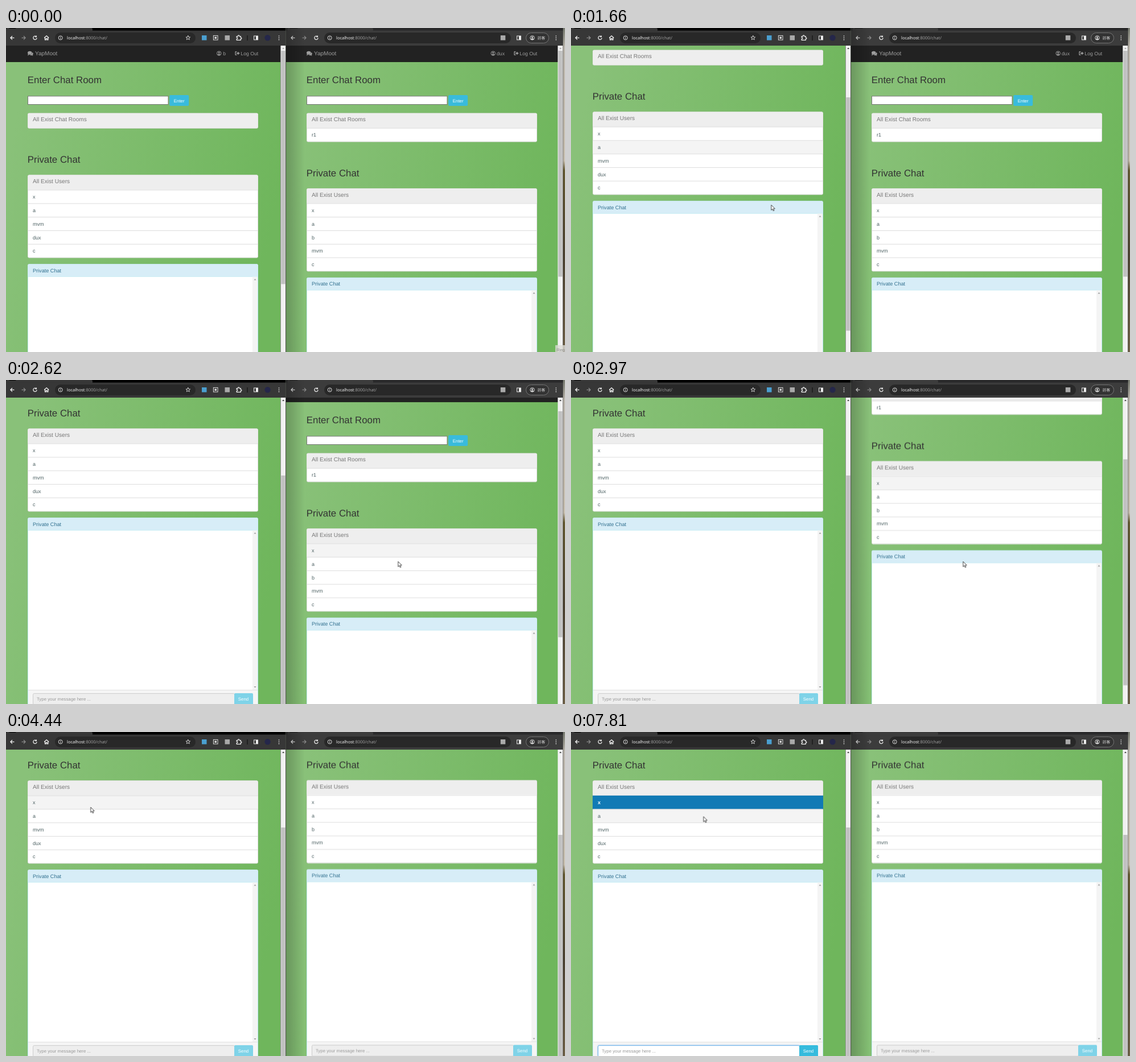
Recreate the animation shown at these times as an HTML page. Size 982x570 px, loop 8 s.

```html
<!DOCTYPE html>
<html lang="en">
<head>
<meta charset="utf-8">
<title>Two chat windows</title>
<style>
html, body { margin: 0; width: 100%; height: 100%; overflow: hidden; background: #000; }
svg { display: block; width: 100%; height: 100%; }
text { font-family: "Liberation Sans", Arial, sans-serif; text-rendering: geometricPrecision; white-space: pre; }
.url { font: 7.5px "Open Sans", sans-serif; }
.cjk { font: 6.7px "Noto Sans CJK TC", "Noto Sans CJK", sans-serif; }
.h { font-size: 16.85px; fill: #333; }
.head { font-size: 10.1px; fill: #777; }
.item { font-size: 9px; fill: #4c6062; }
.panel { font-size: 9.1px; fill: #31708f; }
.small { font-size: 7.85px; }
.nav { fill: #9d9d9d; }
.line { fill: none; stroke-linecap: round; stroke-linejoin: round; stroke-width: 1.3; }

/* --k turns scroll distance into page (-1) or thumb movement */
.page { --k: -1; }
.left .scroll { animation: scrollLeft 8s infinite ease-in-out; }
.right .scroll { animation: scrollRight 8s infinite ease-in-out; }
@keyframes scrollLeft {
  0%, 13.375% { transform: translateY(0); }
  16%, 18.375% { transform: translateY(calc(56px * var(--k))); }
  21%, 21.875% { transform: translateY(calc(112px * var(--k))); }
  24.375% { transform: translateY(calc(168px * var(--k))); }
  25.7%, 100% { transform: translateY(calc(173px * var(--k))); }
}
@keyframes scrollRight {
  0%, 31.75% { transform: translateY(0); }
  34.125% { transform: translateY(calc(56px * var(--k))); }
  36% { transform: translateY(calc(112px * var(--k))); }
  38.3%, 38.5% { transform: translateY(calc(168px * var(--k))); }
  41.1%, 100% { transform: translateY(calc(197.5px * var(--k))); }
}

.left .up { animation: wakeLeft 8s infinite step-end; }
.right .up { animation: wakeRight 8s infinite step-end; }
@keyframes wakeLeft { 0% { fill: #a3a3a3; } 13.9%, 100% { fill: #404040; } }
@keyframes wakeRight { 0% { fill: #a3a3a3; } 32%, 100% { fill: #404040; } }

.toggle { opacity: 0; animation: 8s infinite step-end; }
.left .row0 { animation-name: hoverFirst; }
.left .row1 { animation-name: hoverSecond; }
.right .row0 { animation-name: hoverRight; }
.left .chosen { animation-name: choose; }
.left .ready { animation-name: enable; }
.left .caret { animation-name: blink; }
.tip { animation-name: tip; }
@keyframes hoverFirst {
  0% { opacity: 0; } 53.75% { opacity: 1; } 78.75% { opacity: 0; }
  86.5%, 100% { opacity: 1; }
}
@keyframes hoverSecond {
  0% { opacity: 0; } 12% { opacity: 1; } 27.5% { opacity: 0; }
  78.75% { opacity: 1; } 86.5% { opacity: 0; } 91.5%, 100% { opacity: 1; }
}
@keyframes hoverRight { 0% { opacity: 0; } 31% { opacity: 1; } 46.2%, 100% { opacity: 0; } }
@keyframes choose { 0% { opacity: 0; } 89.2%, 100% { opacity: 1; } }
@keyframes enable { 0% { opacity: 0; } 90.1%, 100% { opacity: 1; } }
@keyframes blink { 0% { opacity: 0; } 90.1% { opacity: 1; } 97.6%, 100% { opacity: 0; } }
@keyframes tip { 0% { opacity: 1; } .87%, 100% { opacity: 0; } }

.shown { animation: appear 8s infinite step-end; }
@keyframes appear { 0% { opacity: 0; } 5%, 100% { opacity: 1; } }
.cursor { animation: move 8s infinite linear; }
@keyframes move {
  0%, 5% { transform: translate(929px, 545px); }
  8% { transform: translate(697px, 429px); }
  12%, 24.5% { transform: translate(351.5px, 311px); }
  28.4% { transform: translate(474px, 316px); }
  31%, 45.1% { transform: translate(688.5px, 319px); }
  47% { transform: translate(660px, 330px); }
  52% { transform: translate(263px, 228px); }
  54.5% { transform: translate(150px, 123px); }
  55.5%, 74.6% { transform: translate(148.5px, 132px); }
  78.5% { transform: translate(175px, 148px); }
  82% { transform: translate(224px, 163px); }
  85%, 86% { transform: translate(231px, 158px); }
  87.5%, 90% { transform: translate(232px, 133px); }
  91.7%, 92.8% { transform: translate(232px, 139px); }
  94.4%, 100% { transform: translate(232.5px, 148.5px); }
}
</style>
</head>
<body>
<svg id="stage" viewBox="0 0 982 570"></svg>
<script>
const ROW = 23.8;

const rect = (x, y, w, h, fill, more = '') =>
  `<rect x="${x}" y="${y}" width="${w}" height="${h}" fill="${fill}" ${more}/>`;
const text = (x, y, label, cls, more = '') =>
  `<text x="${x}" y="${y}" class="${cls}" ${more}>${label}</text>`;
const line = (d, color, more = '') =>
  `<path class="line" d="${d}" stroke="${color}" ${more}/>`;
const circle = (x, y, r, fill, more = '') =>
  `<circle cx="${x}" cy="${y}" r="${r}" fill="${fill}" ${more}/>`;
const arrow = (x, y, dir, cls, fill) =>
  `<path class="${cls}" fill="${fill}" d="M${x - 2} ${y + dir}h4l-2 ${-2.4 * dir}z"/>`;

const person = (x, y, color) =>
  circle(x, y, 3.7, 'none', `stroke="${color}"`) + circle(x, y - 1, 1.4, color) +
  `<path fill="${color}" d="M${x - 2.6} ${y + 2.3}q2.6 -3 5.2 0q-2.6 2.2 -5.2 0z"/>`;

// Browser toolbar parts
const back = (x, color) => line(`M${x + 3} 17.3h-6m2.7 -2.8l-2.8 2.8l2.8 2.8`, color);
const forward = (x, color) => line(`M${x - 3} 17.3h6m-2.7 -2.8l2.8 2.8l-2.8 2.8`, color);
const reload = x => line(`M${x + 2.3} 15.2a3.1 3.1 0 1 0 .7 2.8m-.6 -4.2v1.8h-1.9`, '#e4e4e4');
const sidePanel = x =>
  rect(x - 3.4, 14, 6.8, 6.8, 'none', 'stroke="#eee"') + rect(x, 14, 3.4, 6.8, '#eee');
const dots = x => [14, 17.3, 20.6].map(y => circle(x, y, .85, '#eee')).join('');
const address = (x, w, textX) =>
  rect(x, 8, w, 19, '#282828', 'rx="9.5"') +
  circle(x + 9.7, 17.3, 3.5, 'none', 'stroke="#ddd"') +
  rect(x + 9.2, 16.7, 1, 2.6, '#ddd') + rect(x + 9.2, 15, 1, 1, '#ddd') +
  text(textX, 20, 'localhost<tspan fill="#a5a5a5">:8000/chat/</tspan>', 'url', 'fill="#fff"');

const leftBar =
  rect(0, 0, 492, 6, '#000') + rect(0, 0, 152, 6, '#373737', 'rx="2"') +
  rect(5, -4, 13, 5, '#000', 'rx="2"') + rect(0, 4.5, 492, 26.5, '#373737') +
  back(11, '#f0f0f0') + forward(31, '#8a8a8a') + reload(51) +
  line('M67.5 17l3.7 -3.2l3.7 3.2m-6.4 -.6v4.5h1.8v-2.6h1.8v2.6h1.8v-4.5', '#eee') +
  address(86, 247, 107) +
  line('M319.8 13.4l1.1 2.5l2.7 .2l-2.1 1.8l.7 2.7l-2.4 -1.5l-2.4 1.5l.7 -2.7l-2.1 -1.8l2.7 -.2z',
    '#ddd', 'style="stroke-width:.9"') +
  rect(344, 13, 8.5, 8.5, '#4a9fd0') +
  rect(364.4, 13.4, 7.6, 7.6, 'none', 'stroke="#ddd"') + rect(366.5, 15.5, 3.4, 3.4, '#ddd') +
  rect(384.5, 13, 8.5, 8.5, '#a9a9a9') +
  line('M405.2 14.6h2.2q0 -1.8 1.3 -1.8t1.3 1.8h2.3v2.2q1.6 0 1.6 1.2t-1.6 1.2v2.1h-7.1v-2q1.6 -.2 1.6 -1.3t-1.6 -1.3z', '#eee') +
  rect(423.5, 13, 1, 9, '#0c0c0c') + sidePanel(439) +
  circle(459.5, 17.3, 5.2, '#25274a') + dots(479.5);

const rightBar =
  rect(492, 0, 487, 6, '#29292a') + rect(494, 0, 151, 6, '#3c3c3c', 'rx="2"') +
  rect(498, -4, 15, 5, '#222', 'rx="2"') + rect(492, 4.5, 487, 26.5, '#3c3c3c') +
  back(504, '#ddd') + forward(524, '#858585') + reload(545) + address(559, 328, 580) +
  rect(868.8, 13, 8.5, 8.5, '#aaa') + sidePanel(901) +
  rect(913.5, 8.5, 40, 18, '#333', 'rx="9" stroke="#757575"') +
  person(924.5, 17.3, '#ddd') + text(933.8, 19.8, '訪客', 'cjk', 'fill="#ddd"') + dots(966.3);

const navBar = user =>
  rect(0, 31, 482, 28.6, '#222') + rect(0, 59, 482, .7, '#101010') +
  '<g class="nav"><ellipse cx="41.8" cy="43.8" rx="3.8" ry="3"/><path d="M39 45.5l-1 3l3 -1.6z"/>' +
  '<path d="M46.2 42.8q3.2 2.5 .4 4.6l1.2 1.7l-3 -1q-2.4 .2 -3.2 -1q4.2 -.2 4.6 -4.3z"/>' +
  '<path d="M405.4 41h-2q-1 0 -1 1v5q0 1 1 1h2v-1.2h-1.7v-4.6h1.7z"/>' +
  '<path d="M405 43.6h2.4v-2l3.2 3l-3.2 3v-2h-2.4z"/></g>' +
  text(51, 48.2, 'YapMoot', 'nav', 'font-size="10"') +
  person(386 - user.length * 4.6 - 6.5 - (user.length < 2 ? .7 : 0), 44.6, '#9d9d9d') +
  text(386, 47.8, user, 'nav', 'font-size="8.7" text-anchor="end"') +
  text(412.3, 47.8, 'Log Out', 'nav', 'font-size="8.7"');

const list = (y, title, items, live) => {
  const height = 26.3 + items.length * ROW;
  const rows = items.map((label, i) => {
    const top = y + 26.3 + i * ROW;
    const hover = live && i < 2 ? rect(38.5, top, 404, ROW, '#f4f4f4', `class="toggle row${i}"`) : '';
    const chosen = live && !i
      ? `<g class="toggle chosen">${rect(38, top - .3, 405, ROW + .3, '#117ab5')}` +
        text(47, top + 15, label, 'item', 'style="fill:#fff;font-weight:bold"') + '</g>' : '';
    return hover + rect(38.5, top - .5, 404, 1, '#ddd') + text(47, top + 15, label, 'item') + chosen;
  });
  return rect(38.5, y, 404, height, '#fff', 'rx="2" stroke="#ddd"') +
    rect(38.5, y, 404, 26, '#eee', 'rx="2"') + text(47, y + 14.4, title, 'head') + rows.join('');
};

const messageBox = (y, field, border, button, extra = '') =>
  rect(47.5, y, 354, 19.5, field, `stroke="${border}" rx="2" ${extra}`) +
  rect(401, y - .5, 33, 20.5, button, 'rx="2"') +
  text(54, y + 12.3, 'Type your message here ...', 'small', 'fill="#999"') +
  text(407.8, y + 12.3, 'Send', 'small', 'fill="#fff"');

const chat = y =>
  rect(38.5, y, 404, 345, '#fff', 'rx="2" stroke="#bce8f1"') +
  rect(38.5, y, 404, 21.5, '#d7edf7', 'rx="2"') + rect(38.5, y + 21.3, 404, .8, '#bce8f1') +
  text(47, y + 14, 'Private Chat', 'panel') +
  rect(433, y + 22, 9, 281, '#f4f4f4') +
  arrow(437.5, y + 27, 1, '', '#999') + arrow(437.5, y + 124.5 + 173, -1, '', '#999') +
  rect(39, y + 302.6, 403, 40, '#f5f5f5') + rect(39, y + 302.4, 403, .8, '#ddd') +
  messageBox(y + 309, '#eee', '#ccc', '#7fd3e8') +
  `<g class="toggle ready">${messageBox(y + 309, '#fff', '#66afe9', '#36bbdd', 'filter="url(#glow)"')}</g>` +
  rect(54, y + 313.5, .9, 10, '#333', 'class="toggle caret"');

const browser = ({ side, dx, edge, user, rooms, users, thumb, ratio }) => {
  const dy = rooms.length * ROW;
  return `<g class="${side}" transform="translate(${dx})"><g clip-path="url(#${side}View)">` +
    rect(0, 31, 482, 540, 'url(#grass)') + '<g class="scroll page">' + navBar(user) +
    text(37.8, 97, 'Enter Chat Room', 'h') +
    rect(38.5, 119.9, 246.5, 14.6, '#fff', 'stroke="#767676"') +
    rect(287.2, 118, 34, 19, '#39bbdc', 'rx="2"') + text(294.8, 130.5, 'Enter', 'small', 'fill="#fff"') +
    list(150, 'All Exist Chat Rooms', rooms, false) +
    text(37.8, 237 + dy, 'Private Chat', 'h') +
    list(259 + dy - .2, 'All Exist Users', users, true) + chat(415.8 + dy - .2) + '</g></g>' +
    rect(edge, 31, 9, 539, '#f1f1f1') + arrow(edge + 4.7, 36, 1, 'up', '#404040') +
    `<g class="scroll" style="--k:${ratio}">${rect(edge + 1, 40, 7.2, thumb, '#c1c1c1')}</g></g>`;
};

const gradient = (id, coords, ...stops) =>
  `<linearGradient id="${id}" gradientUnits="userSpaceOnUse" ${coords}>` +
  stops.map(([at, color, alpha = 1]) =>
    `<stop offset="${at}" stop-color="${color}" stop-opacity="${alpha}"/>`).join('') + '</linearGradient>';
const view = (side, x, w) => `<clipPath id="${side}View">${rect(x, 31, w, 539, '#000')}</clipPath>`;

document.getElementById('stage').innerHTML = `<defs>
  ${gradient('grass', 'x1="0" y1="250" x2="470" y2="340"', [0, '#89c179'], [1, '#6fb65c'])}
  ${gradient('shade', 'x1="492" y1="0" x2="524" y2="0"', [0, '#000', .22], [1, '#000', 0])}
  ${gradient('desk', 'x1="0" y1="0" x2="0" y2="570"', [0, '#777b70'], [.06, '#b9b4ab'], [.41, '#c5bdae'],
    [.44, '#655a32'], [.7, '#4c4232'], [1, '#6f6147'])}
  ${view('left', 0, 482.5)}${view('right', 2, 477.5)}
  <filter id="glow" x="-5%" y="-40%" width="110%" height="180%">
    <feDropShadow dx="0" dy="0" stdDeviation="1.8" flood-color="#66afe9" flood-opacity=".6"/></filter>
  </defs>` +
  browser({ side: 'left', dx: 0, edge: 482.4, user: 'b', rooms: [],
    users: ['x', 'a', 'mvm', 'dux', 'c'], thumb: 410.5, ratio: .738 }) +
  browser({ side: 'right', dx: 490, edge: 479.3, user: 'dux', rooms: ['r1'],
    users: ['x', 'a', 'b', 'mvm', 'c'], thumb: 397.5, ratio: .714 }) +
  rightBar + rect(492, 0, 32, 570, 'url(#shade)') +
  leftBar + rect(491.2, 0, .8, 570, '#4a4f48') +
  rect(978.6, 0, 3.4, 570, 'url(#desk)') +
  `<g class="toggle tip">${rect(965, 558, 17, 12, '#dcdcd6', 'opacity=".8"')}` +
  text(967, 569, 'Reg', 'small', 'fill="#8b8b8b"') + '</g>' +
  `<g class="shown"><path class="cursor" fill="#fff" stroke="#333" stroke-width=".9"
    d="M.3 .3v9.2l2.1 -2l1.5 3.3l1.5 -.7l-1.5 -3.2h2.9z"/></g>`;
</script>
</body>
</html>
```
